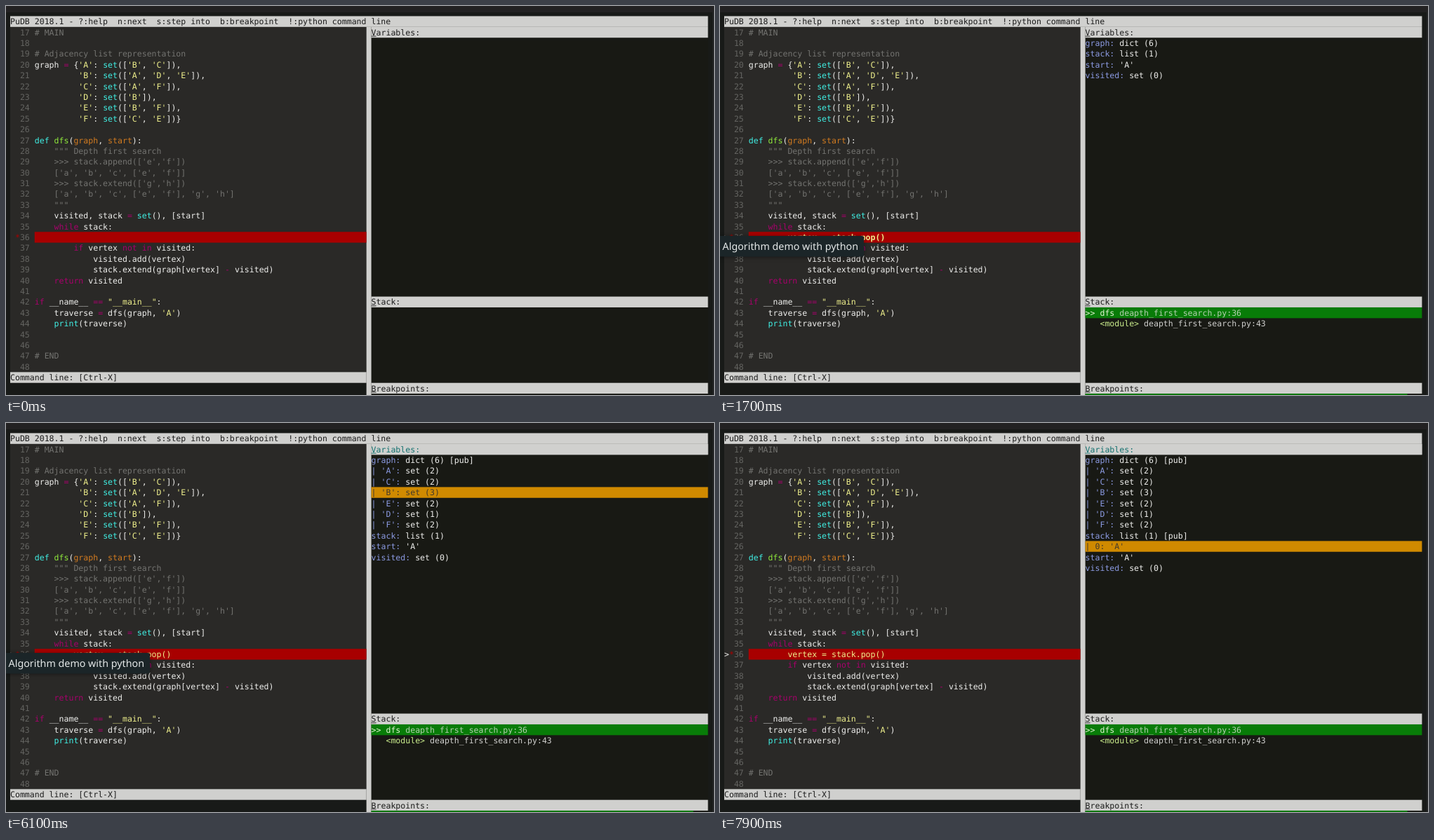
Write an HTML page that moves like this. It is 1009 px wide and 555 px high and loops after 8 s.

```html
<!DOCTYPE html>
<html lang="en">
<head>
<meta charset="utf-8">
<title>Debugger session</title>
<style>
  html, body { margin: 0; width: 100%; height: 100%; overflow: hidden; background: #181a18; }
  svg { display: block; width: 1009px; height: 555px; }
  text { font: 11.55px "DejaVu Sans Mono", monospace; white-space: pre; text-rendering: geometricPrecision; }
  .bold { font-weight: bold; }
  .tip { font: 14.3px "Noto Sans", sans-serif; }
</style>
</head>
<body>
<svg id="stage" viewBox="0 0 1009 555"></svg>
<script>
const LOOP = 8000, X0 = 6, Y0 = 14.45, CW = 6.954, RH = 15.39, PANE = 74, COLS = 143;
const C = {
  bar: '#d0d0ce', ink: '#1c1c1c', code: '#2a2927', pane: '#181914', term: '#181a18',
  white: '#eeeeec', grey: '#737370', num: '#646461', key: '#a8006c', cyan: '#40efe4',
  green: '#8fe83c', arg: '#d27b20', str: '#eff08c', red: '#a80000', label: '#8b9ae2',
  pick: '#d08a00', pickInk: '#433a2c', stack: '#087c08', path: '#d0d0ce',
  blue: '#19b5ce', gold: '#d3ba30', lime: '#22d322'
};
const stage = document.getElementById('stage');
const x = col => X0 + col * CW;
const y = row => Y0 + row * RH;

function add(parent, tag, attrs, text) {
  const el = document.createElementNS('http://www.w3.org/2000/svg', tag);
  for (const k in attrs) el.setAttribute(k, attrs[k]);
  if (text) el.textContent = text;
  return parent.appendChild(el);
}
const group = () => add(stage, 'g', {});
const box = (g, left, top, right, bottom, fill) =>
  add(g, 'rect', { x: left, y: top, width: right - left, height: bottom - top, fill });
const cells = (g, row, from, to, fill) =>
  box(g, x(from), y(row), x(to), y(row + 1), fill);

function put(g, row, col, text, fill, cls = '') {
  const lead = text.search(/\S/);
  if (lead < 0) return;
  add(g, 'text', { x: x(col + lead), y: y(row) + 11.8, fill, class: cls }, text.slice(lead));
}

// Draws [text, colour, class] runs one after another.
function runs(g, row, col, list) {
  for (const [text, fill, cls] of list) {
    put(g, row, col, text, fill, cls);
    col += text.length;
  }
}

// Shows an element only between two times of the loop.
function show(el, from, to = LOOP) {
  const steps = [[0, 0], [from, 1], [to, 0], [LOOP, 0]];
  el.animate(
    steps.map(([t, opacity]) => ({ offset: t / LOOP, opacity, easing: 'step-end' })),
    { duration: LOOP, iterations: Infinity });
  return el;
}

// Frame of the window
const ui = group();
box(ui, 0, 0, 1009, 555, C.term);
box(ui, 0, 0, 1009, 9, '#222122');
box(ui, 1007, 9, 1009, 555, '#222324');
box(ui, x(0), y(1), x(73), y(33), C.code);
box(ui, x(PANE), y(1), x(COLS), 555, C.pane);
box(ui, x(73), y(1), x(PANE), 555, C.bar);
cells(ui, 0, 0, COLS, C.bar);
cells(ui, 33, 0, 73, C.bar);
put(ui, 0, 0, 'PuDB 2018.1 - ?:help  n:next  s:step into  b:breakpoint  !:python command line', C.ink);
put(ui, 33, 0, 'Command line: [Ctrl-X]', C.ink);

function header(g, row, text, fill) {
  cells(g, row, PANE, COLS, C.bar);
  put(g, row, PANE, text, fill);
  box(g, x(PANE), y(row) + 12.8, x(PANE + 1), y(row) + 13.7, fill);
}
header(ui, 1, 'Variables:', C.ink);
header(ui, 26, 'Stack:', C.ink);
header(ui, 34, 'Breakpoints:', C.ink);
header(show(group(), 2200), 1, 'Variables:', '#14716f');

// Source pane
const source = `# MAIN

# Adjacency list representation
graph = {'A': set(['B', 'C']),
         'B': set(['A', 'D', 'E']),
         'C': set(['A', 'F']),
         'D': set(['B']),
         'E': set(['B', 'F']),
         'F': set(['C', 'E'])}

def dfs(graph, start):
    """ Depth first search
    >>> stack.append(['e','f'])
    ['a', 'b', 'c', ['e', 'f']]
    >>> stack.extend(['g','h'])
    ['a', 'b', 'c', ['e', 'f'], 'g', 'h']
    """
    visited, stack = set(), [start]
    while stack:

        if vertex not in visited:
            visited.add(vertex)
            stack.extend(graph[vertex] - visited)
    return visited

if __name__ == "__main__":
    traverse = dfs(graph, 'A')
    print(traverse)


# END
`.split('\n');

const rules = [
  [/^('[^']*'|"[^"]*")/, C.str],
  [/^(while|if|not|in|return)\b/, C.key],
  [/^(==|=|-)/, C.key],
  [/^(def|set|print)\b/, C.cyan],
  [/^dfs(?=\(graph, start)/, C.green],
  [/^(graph(?=, start)|start(?=\):))/, C.arg],
  [/^(\w+|\s+|[^\w\s'"=-]+?)/, C.white]
];

function highlight(line) {
  const out = [];
  while (line) {
    const [re, fill] = rules.find(([re]) => re.test(line));
    const text = line.match(re)[0], last = out[out.length - 1];
    if (last && last[1] === fill) last[0] += text;
    else out.push([text, fill]);
    line = line.slice(text.length);
  }
  return out;
}

let doc = false;
source.forEach((line, i) => {
  const row = i + 1, quote = line.includes('"""');
  put(ui, row, 2, String(i + 17), C.num);
  if (doc || quote || line[0] === '#') put(ui, row, 5, line, C.grey);
  else runs(ui, row, 5, highlight(line));
  if (quote) doc = !doc;
});

cells(ui, 20, 5, 73, C.red);
put(ui, 20, 1, '*', C.red);
const stop = 'vertex = stack.pop()';
put(show(group(), 0, 600), 20, 13, stop, C.str);
put(show(group(), 600, 2200), 20, 13, stop, C.str, 'bold');
put(show(group(), 2200), 20, 13, stop, C.str);
put(show(group(), 600), 20, 0, '>', C.white);

// Stack pane
const file = ' deapth_first_search.py:';
function frames(g, name, line) {
  cells(g, 27, PANE, COLS, C.stack);
  runs(g, 27, PANE, [['>> ' + name, '#e6f6d6'], [file + line, '#b4cfb0']]);
  return g;
}
frames(show(group(), 0, 600), '<module>', 15);
const inner = frames(show(group(), 600), 'dfs', 36);
runs(inner, 28, PANE, [['   <module>', '#cdf08e'], [file + 43, C.path]]);
cells(inner, 35, PANE, COLS - 3, C.stack);

// Variables pane
const sizes = { A: 2, C: 2, B: 3, E: 2, D: 1, F: 2 };
const items = Object.entries(sizes).map(([k, n]) => `| '${k}': set (${n})`);
const tail = ["start: 'A'", 'visited: set (0)'];
const closed = ['graph: dict (6)', 'stack: list (1)', ...tail];
const open = ['graph: dict (6) [pub]', ...items, 'stack: list (1)', ...tail];
const full = ['graph: dict (6) [pub]', ...items, 'stack: list (1) [pub]', "| 0: 'A'", ...tail];

for (const [from, to, list] of [[600, 3500, closed], [3500, 7500, open], [7500, LOOP, full]]) {
  const g = show(group(), from, to);
  list.forEach((text, i) => {
    const cut = text.indexOf(':') + 1;
    runs(g, i + 2, PANE, [[text.slice(0, cut), C.label], [text.slice(cut), C.white]]);
  });
}

const picks = [
  [2200, closed, 0], [3500, open, 0], [5600, open, 1], [6100, open, 3], [6200, open, 5],
  [6400, open, 6], [6600, open, 7], [7500, full, 7], [7900, full, 8]
];
picks.forEach(([from, list, i], n) => {
  const g = show(group(), from, n + 1 < picks.length ? picks[n + 1][0] : LOOP);
  cells(g, i + 2, PANE, COLS, C.pick);
  put(g, i + 2, PANE, list[i], C.pickInk);
});

// Tooltip
const tip = show(group(), 1700, 7600);
add(tip, 'rect', { x: -6, y: 328, width: 211, height: 29.5, rx: 3, fill: '#1b2528',
  style: 'filter: drop-shadow(0 1px 3px rgba(0,0,0,.4))' });
add(tip, 'text', { x: 3.6, y: 348.3, fill: '#e4e8e8', class: 'tip' }, 'Algorithm demo with python');

// Shell screen
const shell = show(group(), 500, 600);
box(shell, 0, 9, 1007, 555, C.term);
add(shell, 'circle', { cx: 114, cy: 168, r: 80, fill: C.blue });
const info = [
  ['OS:', ' Arch Linux x86_64'],
  ['Hostname:', ' solverin'],
  ['Kernel Release:', ' 4.19.13-1-MANJARO'],
  ['Uptime:', ' 10:22'],
  ['WM:', ' None'],
  ['DE:', ' GNOME'],
  ['Packages:', ' 1509'],
  ['RAM:', ' / 7431 MB', ' 4200 MB', C.gold],
  ['Processor Type:', ' Intel(R) Core(TM) i5-7200U CPU @ 2.50GHz'],
  ['$EDITOR:', ' nvim'],
  ['Root:', ' / 220G (24%) (ext4)', ' 54G', C.lime]
];
info.forEach(([name, value, used = '', fill], i) =>
  runs(shell, i + 1, 32, [[name, C.blue, 'bold'], [used, fill, 'bold'], [value, C.path]]));

function arrow(col, fill) {
  const top = y(20), bottom = y(21);
  add(shell, 'path', { d: `M${x(col)} ${top}L${x(col + 1)} ${(top + bottom) / 2}L${x(col)} ${bottom}Z`, fill });
}
cells(shell, 20, 0, 14, '#000');
cells(shell, 20, 14, 58, C.blue);
cells(shell, 20, 58, 71, C.gold);
arrow(14, '#000');
arrow(58, C.blue);
arrow(71, C.gold);
put(shell, 20, 1, 'kiv@solverin', C.path);
put(shell, 20, 16, '~/Documents/python.kivsolverin/Algorithms', '#101010');
put(shell, 20, 62, 'master', '#101010');
put(shell, 20, 73, 'pudb deapth_first_search.py', C.path);
add(shell, 'path', { d: 'M423.5 325v10M423.5 332q4-1 4-6M484.5 329.6h8M488.5 325.6v8',
  fill: 'none', stroke: '#101010', 'stroke-width': 1.8 });
cells(shell, 21, 0, 1, '#c9c9c7');

// Mouse pointer
function pointer(cx, cy, from, to) {
  const g = show(group(), from, to);
  const d = `M${cx - 3} ${cy - 7.5}h6M${cx} ${cy - 7.5}v15M${cx - 3} ${cy + 7.5}h6`;
  for (const [stroke, w] of [['#f0f0f0', 2.8], ['#111', 1]])
    add(g, 'path', { d, fill: 'none', stroke, 'stroke-width': w, 'stroke-linecap': 'square' });
}
pointer(62, 28, 500, 600);
pointer(60.5, 238, 600, 900);
pointer(60.5, 241, 900, 1100);
pointer(307, 295, 1100, 1200);
</script>
</body>
</html>
```
